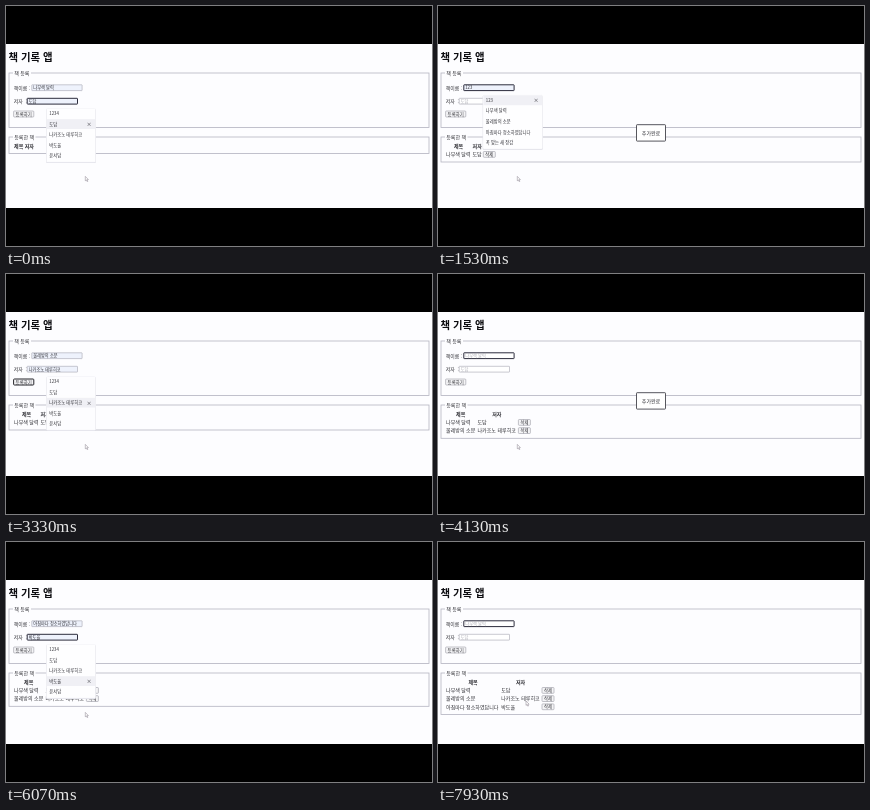
An HTML page for the animation above (8000 ms loop, 426 px wide and 240 px high).

```html
<!DOCTYPE html>
<html lang="ko">
<head>
<meta charset="utf-8">
<title>책 기록 앱</title>
<style>
  html, body { margin: 0; width: 100%; height: 100%; overflow: hidden; background: #000; }
  svg { display: block; width: 100%; height: 100%; }
  text { font-family: "Noto Sans CJK KR", "Noto Sans CJK JP", "Noto Sans CJK", sans-serif; white-space: pre; }
</style>
</head>
<body>
<svg id="stage" viewBox="0 0 426 240"></svg>
<script>
const LOOP = 8000;
const PAGE = '#fdfdff', INK = '#303036', LINE = '#b4b4c0', TINT = '#eef2fc';

const fields = {
  book: {
    label: '책이름 :', y: 81.7, x: 25.8, menu: { x: 45, y: 89.3, w: 59.5 },
    options: ['123', '나무색 달력', '물레방의 소문', '아침마다 청소하였답니다', '꼭 맞는 새 장갑'],
    placeholder: 1
  },
  author: {
    label: '저자  :', y: 95.2, x: 21.2, menu: { x: 40.5, y: 102.5, w: 49 },
    options: ['1234', '도담', '나카조노 테루히코', '박도율', '윤서담'],
    placeholder: 1
  }
};

// Registered pairs of option indices, and the moment each is submitted
const entries = [
  { book: 1, author: 1, at: 700 },
  { book: 2, author: 2, at: 3700 },
  { book: 3, author: 3, at: 6750 }
];

// Autofill menus; each pick is [time, option index]
const menus = [
  { field: 'book', open: -2000, close: -1500, picks: [[-1900, 1]] },
  { field: 'author', open: -400, close: 250, picks: [[-200, 0], [-70, 1]] },
  { field: 'book', open: 1250, close: 1980, picks: [[1420, 0], [1620, 1], [1780, 2]] },
  { field: 'author', open: 2380, close: 3330, picks: [[2540, 0], [2740, 1], [2900, 2]] },
  { field: 'book', open: 4250, close: 5150, picks: [[4380, 0], [4520, 1], [4680, 2], [4830, 3]] },
  { field: 'author', open: 5480, close: 6240, picks: [[5580, 0], [5700, 1], [5830, 2], [5960, 3]] }
];

const focusChanges = [
  [0, 'author'], [230, 'button'], [850, 'book'], [2150, 'author'], [3270, 'button'],
  [3900, 'book'], [5300, 'author'], [6400, 'button'], [7000, 'book']
];

// Table geometry by number of rows
const tables = [
  { bottom: 147.5, title: 12.7, author: 23.3 },
  { bottom: 156, title: 20.6, author: 39.2, col: 34.4, button: 45.3 },
  { bottom: 164.3, title: 22.7, author: 58.8, col: 39.4, button: 80.4 },
  { bottom: 172.5, title: 35, author: 82.6, col: 63.2, button: 104 }
];

const clamp = v => Math.max(0, Math.min(1, v));
const fade = (t, from, to, ms) => Math.min(clamp((t - from) / ms), clamp(1 - (t - to) / ms));
const lastBefore = (list, t) => list.filter(([at]) => at <= t).pop();

const rect = (x, y, w, h, fill, stroke = 'none', line = 0.7, r = 0) =>
  `<rect x="${x}" y="${y}" width="${w}" height="${h}" rx="${r}" fill="${fill}" stroke="${stroke}" stroke-width="${line}"/>`;

// y is the vertical middle of the glyphs
const text = (str, x, y, size, { fill = INK, weight = 400, anchor = 'start' } = {}) =>
  `<text x="${x}" y="${y + size * 0.37}" font-size="${size}" fill="${fill}" font-weight="${weight}" text-anchor="${anchor}">${str}</text>`;

const button = (label, x, y, w, h, size, focused) =>
  rect(x, y - h / 2, w, h, '#f4f4f6', focused ? '#25252b' : '#9a9aa4', focused ? 1 : 0.6, 0.8) +
  text(label, x + w / 2, y, size, { anchor: 'middle' });

const fieldset = (legend, top, bottom, gap) =>
  rect(3, top, 420, bottom - top, 'none', LINE, 0.8) +
  rect(7, top - 2, gap, 4, PAGE) + text(legend, 8.2, top, 5);

function input(name, value, focused) {
  const { label, x, y, options, placeholder } = fields[name];
  const filled = value !== undefined;
  return text(label, 7.8, y, 4.9) +
    rect(x, y - 2.9, 50.3, 5.8, filled ? TINT : '#fff', focused ? '#2c2c3c' : '#a4a4b0', focused ? 1 : 0.6, 0.4) +
    text(options[filled ? value : placeholder], x + 1.5, y, 4.2, { fill: filled ? INK : '#aeaeb6' });
}

function table(count) {
  const g = tables[count];
  const headY = count ? 140.2 : 140;
  const head = { weight: 700, anchor: 'middle' };
  const rows = entries.slice(0, count).map((entry, i) => {
    const y = 148.4 + i * 8.2;
    return text(fields.book.options[entry.book], 8, y, 5.05) +
      text(fields.author.options[entry.author], g.col, y, 5.05) +
      button('삭제', g.button, y, 12, 5.8, 4.3);
  });
  return fieldset('등록한 책', 131, g.bottom, 22.5) +
    text('제목', g.title, headY, 5, head) + text('저자', g.author, headY, 5, head) + rows.join('');
}

function menu(m, t) {
  const opacity = fade(t, m.open, m.close, 140);
  if (!opacity) return '';
  const { menu: { x, y, w }, options } = fields[m.field];
  const pick = lastBefore(m.picks, t);
  const items = options.map((option, i) => {
    const mid = y + 5 + i * 10.55;
    const active = pick && pick[1] === i;
    return (active
      ? rect(x + 0.5, mid - 4.9, w - 1, 9.8, '#f0f0f5') +
        text('×', x + w - 6.5, mid, 5.2, { anchor: 'middle', fill: '#33333a' })
      : '') + text(option, x + 2.8, mid, 4.3);
  });
  return `<g opacity="${opacity}">` +
    rect(x - 0.3, y + 0.5, w + 0.6, 54, '#dcdce4', 'none', 0, 1) +
    rect(x, y, w, 53.7, '#fefeff', '#ececf1', 0.4, 1) + items.join('') + '</g>';
}

function toast(t) {
  const opacity = Math.max(...entries.map(({ at }) => fade(t, at, at + 1000, 100)));
  return opacity ? `<g opacity="${opacity}">` + rect(198.5, 118.7, 29, 16.4, '#fff', '#44444c', 0.9, 0.6) +
    text('추가완료', 213, 127, 5, { anchor: 'middle' }) + '</g>' : '';
}

function pointer(t) {
  const p = clamp((t - 7300) / 500), e = p * p * (3 - 2 * p);
  return `<path transform="translate(${79.3 + 8.7 * e} ${170.4 - 11.4 * e})" d="M0 0V4.4L1 3.5L1.8 5.2L2.5 4.9L1.8 3.2H3.1Z" fill="#fff" stroke="#88808c" stroke-width=".5"/>`;
}

function scene(t) {
  const submitted = entries.filter(e => e.at <= t);
  const since = submitted.length ? submitted[submitted.length - 1].at : -Infinity;
  const focus = lastBefore(focusChanges, t)[1];
  const valueOf = name => {
    const picks = menus.filter(m => m.field === name).flatMap(m => m.picks);
    return lastBefore(picks.filter(([at]) => at > since), t)?.[1];
  };
  return rect(0, 0, 426, 240, '#000') + rect(0, 38, 426, 164, PAGE) +
    text('책 기록 앱', 2.6, 51.1, 10.4, { weight: 700, fill: '#0c0c10' }) +
    fieldset('책 등록', 67, 121.5, 18) +
    ['book', 'author'].map(name => input(name, valueOf(name), focus === name)).join('') +
    button('등록하기', 7.6, 108, 20.2, 6, 4.4, focus === 'button') +
    table(submitted.length) + toast(t) +
    menus.map(m => menu(m, t)).join('') + pointer(t);
}

const stage = document.getElementById('stage');
const start = performance.now();
let shown = '';
function draw() {
  const next = scene((performance.now() - start) % LOOP);
  if (next !== shown) stage.innerHTML = shown = next;
  requestAnimationFrame(draw);
}
draw();
</script>
</body>
</html>
```
